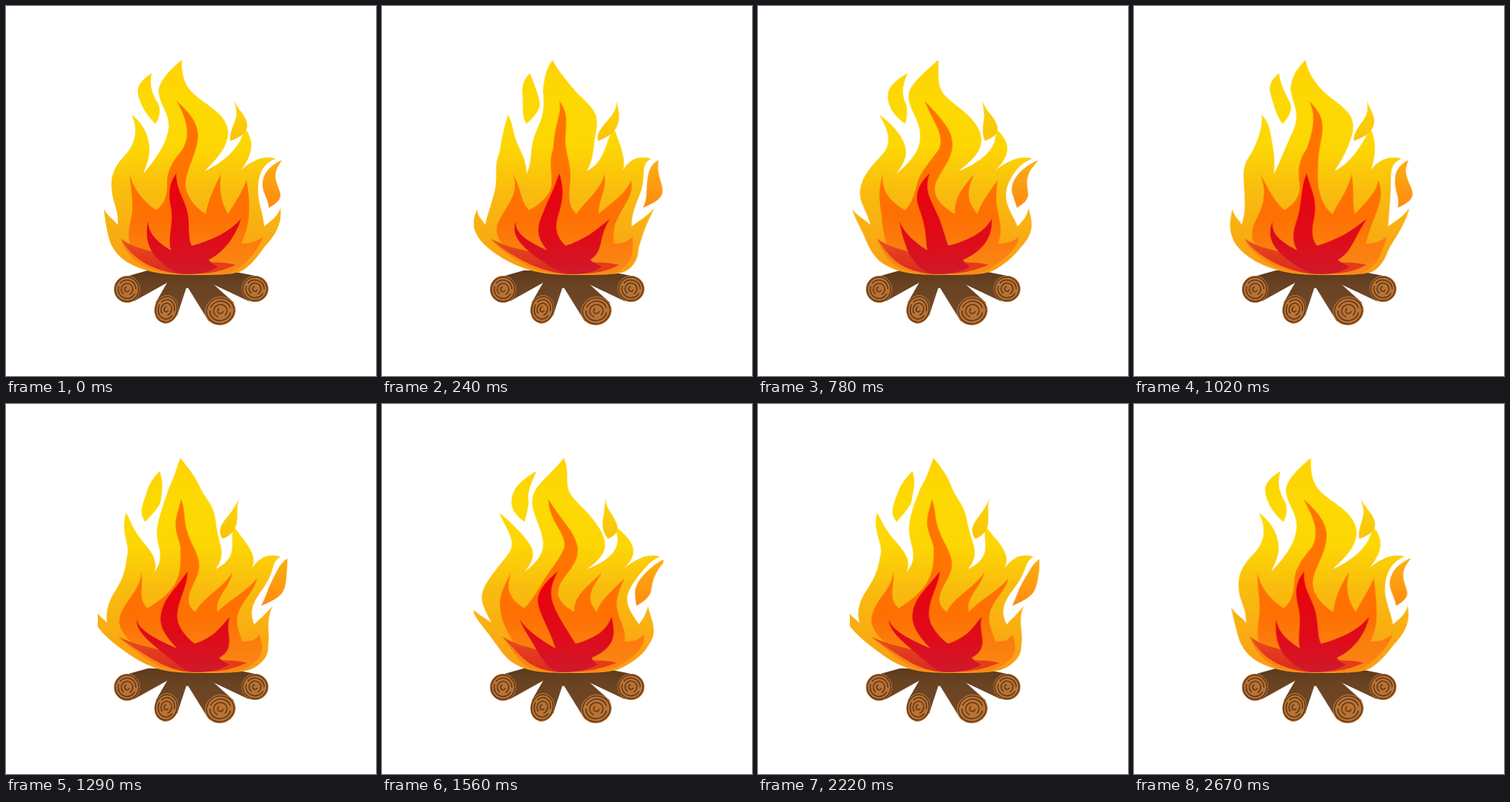
Recreate the animation shown at these times as an HTML page with a canvas. Size 480x480 px, loop 2.7 s.

```html
<!DOCTYPE html>
<html lang="en">
<head>
<meta charset="utf-8">
<title>Campfire</title>
<style>
  html, body { margin: 0; width: 100%; height: 100%; overflow: hidden; background: #fff; }
  canvas { display: block; width: 480px; height: 480px; }
</style>
</head>
<body>
<canvas id="stage" width="480" height="480"></canvas>
<script>
const SIZE = 480, PERIOD = 900, STEP = 30;
const LEFT = 119, RIGHT = 365, TOP = 66, BOTTOM = 351;
const SWAY = 7.4, WAVELENGTH = 117, REST_Y = 142, LAG = 105;

const stage = document.getElementById('stage').getContext('2d');

function layer(paint) {
  const canvas = document.createElement('canvas');
  canvas.width = canvas.height = SIZE;
  paint(canvas.getContext('2d'));
  return canvas;
}

function vertical(ctx, y0, y1, ...colors) {
  const gradient = ctx.createLinearGradient(0, y0, 0, y1);
  colors.forEach((color, i) => gradient.addColorStop(i / (colors.length - 1), color));
  return gradient;
}

function shape(ctx, fill, path) {
  ctx.fillStyle = fill;
  ctx.fill(new Path2D(path));
}

const fire = layer(ctx => {
  const yellow = vertical(ctx, 70, 350, '#ffd200', '#fdd903', '#fdd704', '#f9bd0e', '#f9ad12', '#fd9a14');

  // Body and sparks
  shape(ctx, yellow, `M228 70 C213 82 198 98 198 111 C199 128 212 139 211 157
    C209 182 188 205 178 218 C182 206 187 197 186 183 C185 166 176 150 163 141
    C173 163 166 181 154 194 C139 210 136 221 137 238 C139 258 146 262 145 284
    C139 276 131 272 127 263 C128 274 130 288 133 299 C137 318 152 332 171 339
    C188 346 207 349 240 349 C272 349 293 349 305 344 C316 338 326 326 335 313
    C347 300 359 284 356 262 C352 274 343 279 335 286 C334 270 327 256 327 239
    C327 217 334 204 350 198 C333 193 317 202 305 213 C314 201 320 187 318 176
    C316 168 314 162 309 160 C305 184 279 205 258 214 C271 200 289 184 288 162
    C286 143 268 133 252 121 C238 111 227 98 228 70Z`);
  shape(ctx, yellow, `M189 87 C177 95 170 103 171 112 C173 128 183 142 194 153
    C200 144 201 133 197 126 C191 116 185 104 189 87Z`);
  shape(ctx, vertical(ctx, 122, 175, '#fdd503', '#f9c30b'), `M296 122
    C301 136 313 142 313 156 C312 166 302 171 291 175 C289 162 299 150 299 140 C299 133 297 128 296 122Z`);
  shape(ctx, vertical(ctx, 200, 262, '#fab010', '#ff8a12'), `M358 200
    C341 207 332 219 333 234 C334 244 340 250 341 262 C349 257 357 252 356 244
    C354 234 348 227 350 216 C351 210 355 205 358 200Z`);

  // Orange heart
  shape(ctx, vertical(ctx, 123, 349, '#ff7300', '#ff7500', '#ff7003', '#f98a18'), `M221 123
    C233 143 241 166 229 186 C214 204 208 216 209 233 C209 249 204 258 195 265
    C181 255 166 241 160 217 C163 245 167 262 161 281 C159 292 158 302 161 309
    L149 302 C155 322 172 337 194 344 C207 349 275 349 289 347 C309 339 326 319 334 299
    C325 306 315 309 305 308 C315 290 319 262 312 226 C304 247 294 259 288 270
    C280 255 276 242 279 218 C269 237 262 253 259 270 C244 260 232 245 233 229
    C235 208 250 188 249 165 C247 147 234 135 221 123Z`);

  // Red core
  shape(ctx, vertical(ctx, 300, 348, '#e8561c', '#e23a1e', '#dc2a20'), `M149 302
    C161 312 178 315 195 320 L240 340 L232 348 C199 346 166 333 149 302Z`);
  shape(ctx, '#e63c18', `M250 331 C266 334 282 331 298 336 C286 341 274 346 255 347 L230 342Z`);
  shape(ctx, vertical(ctx, 217, 348, '#ec040c', '#e40612', '#df0c1a', '#cf1a2c'), `M221 217
    C210 232 211 246 214 262 C218 282 209 300 214 317 C199 308 185 297 184 279
    C180 301 185 318 200 331 C210 341 222 348 238 348 C254 348 267 344 275 338
    C269 335 265 333 263 329 C283 320 298 298 305 276 C291 292 268 304 241 311
    C235 300 239 281 235 266 C231 249 220 236 221 217Z`);
});

const logs = layer(ctx => {
  const bark = vertical(ctx, 343, 385, '#5d3a1e', '#6a4322', '#6f4626');
  shape(ctx, bark, 'M152 352 L184 343 L245 347 L218 354 L166 383Z');
  shape(ctx, bark, 'M245 346 L298 345 L328 351 L315 383 L262 358Z');
  shape(ctx, bark, 'M213 352 L240 347 L222 402 L194 385Z');
  shape(ctx, bark, 'M229 354 L258 351 L296 385 L263 409Z');
  shape(ctx, bark, 'M184 343 L298 345 L266 360 L234 366 L213 355Z');

  const cut = (x, y, rx, ry, turn) => {
    const ring = (scale, from, to) => {
      ctx.beginPath();
      ctx.ellipse(x, y, rx * scale, ry * scale, turn, from, to);
      ctx.stroke();
    };
    ctx.fillStyle = '#ba7335';
    ctx.strokeStyle = '#5f3818';
    ctx.lineWidth = 1.5;
    ctx.beginPath();
    ctx.ellipse(x, y, rx, ry, turn, 0, 7);
    ctx.fill();
    ring(0.9, 0, 6.3);
    ring(0.68, 0.5, 3.5);
    ring(0.68, 3.8, 6.3);
    ring(0.44, 2.2, 7.4);
    ring(0.18, 0.3, 4.6);
  };
  cut(157, 367.5, 17, 17.5, 0);
  cut(208, 393.5, 15.5, 18.5, 0.2);
  cut(278, 395.5, 20, 18.5, -0.3);
  cut(323, 367, 17.5, 17, 0);
});

// A sine wave climbs the fire and pushes each row sideways.
function sway(y, time) {
  const turns = (time - LAG) / PERIOD - (REST_Y - y) / WAVELENGTH;
  return SWAY * Math.cos(turns * 2 * Math.PI);
}

function draw(now) {
  const time = Math.floor(now / STEP) * STEP % PERIOD;
  stage.fillStyle = '#fff';
  stage.fillRect(0, 0, SIZE, SIZE);
  stage.drawImage(logs, 0, 0);
  stage.save();
  stage.beginPath();
  stage.rect(LEFT, TOP, RIGHT - LEFT, BOTTOM - TOP);
  stage.clip();
  for (let y = TOP; y < BOTTOM; y++) {
    const shift = sway(y, time) - sway(y, 0);
    stage.drawImage(fire, 0, y, SIZE, 1, shift, y, SIZE, 1);
  }
  stage.restore();
  requestAnimationFrame(() => draw(performance.now()));
}
draw(0);
</script>
</body>
</html>
```
